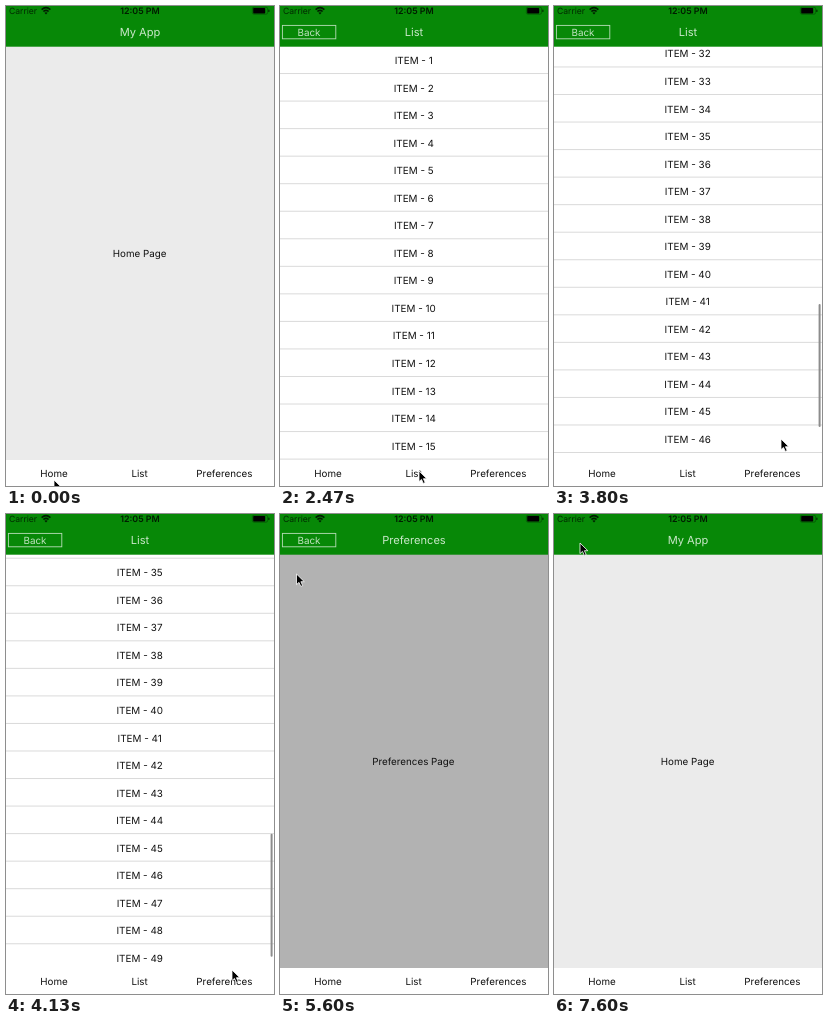
An HTML page for the animation above (8000 ms loop, 268 by 480 pixels).

```html
<!DOCTYPE html>
<html lang="en">
<head>
<meta charset="utf-8">
<title>My App</title>
<style>
html, body { margin: 0; width: 100%; height: 100%; overflow: hidden; background: #fff; }
svg { display: block; width: 100%; height: 100%; }
text {
  font-family: Inter, "Liberation Sans", sans-serif;
  text-anchor: middle; white-space: pre; text-rendering: geometricPrecision;
}
</style>
</head>
<body>
<svg id="stage" viewBox="0 0 268 480">
  <defs><clipPath id="view"><rect y="40" width="268" height="414"/></clipPath></defs>
  <g id="home"></g>
  <g id="list"></g>
  <g id="prefs"></g>
  <g id="status" fill="#011c01">
    <path d="M35.6 3.6Q40 -.4 44.4 3.6M37.4 5.5Q40 3.2 42.6 5.5" fill="none" stroke="#011c01" stroke-width="1.5"/>
    <path d="M38.4 6.8Q40 5.6 41.6 6.8L40 8.4Z"/>
    <rect x="246.4" y="1.2" width="15.2" height="7" rx="1.6" fill="none" stroke="#044804" stroke-width=".6"/>
    <rect x="247.2" y="2" width="12" height="5.4" rx=".7" fill="#000"/>
    <rect x="262.4" y="3.6" width="1" height="2.4" rx=".5"/>
  </g>
  <g id="tabs"><rect y="454" width="268" height="26" fill="#fff"/></g>
  <path id="cursor" d="M0 0V10.6L2.5 8.4L4.3 12.4L6.2 11.6L4.4 7.7H7.8Z"
    fill="#000" stroke="#fff" stroke-width=".8" stroke-linejoin="round"/>
</svg>
<script>
const LOOP = 8000, ROW = 27.54, COUNT = 50, TOP = 40, VIEW = 414;
const MAX = ROW * COUNT - VIEW;
const $ = id => document.getElementById(id);

function add(parent, tag, attrs, content = "") {
  const el = document.createElementNS("http://www.w3.org/2000/svg", tag);
  for (const key in attrs) el.setAttribute(key, attrs[key]);
  el.textContent = content;
  return parent.appendChild(el);
}
const box = (parent, x, y, width, height, fill) => add(parent, "rect", { x, y, width, height, fill });
// Text centred on (x, y)
const label = (parent, s, x, y, size, fill = "#111", weight = 400) =>
  add(parent, "text", { x, y: y + size * .36, "font-size": size, fill, "font-weight": weight }, s);

function header(page, title, back) {
  box(page, 0, 0, 268, TOP + .7, "#078807");
  label(page, title, 134, 26.4, 11.1, "#cbe8cb");
  if (!back) return;
  add(page, "rect", { x: 2.4, y: 19.4, width: 53.4, height: 13.4, fill: "none", stroke: "#b5dcb5", "stroke-width": .9 });
  label(page, "Back", 29, 26, 9.9, "#c0e2c0");
}

const home = $("home"), list = $("list"), prefs = $("prefs");
box(home, 0, TOP, 268, VIEW, "#ebebeb");
label(home, "Home Page", 133.6, 247.5, 9.8);
header(home, "My App");

box(list, 0, TOP, 268, VIEW, "#fff");
const clip = add(list, "g", { "clip-path": "url(#view)" });
const rows = add(clip, "g", {});
for (let i = 0; i < COUNT; i++) {
  const y = TOP + i * ROW;
  label(rows, "ITEM - " + (i + 1), 133.7, y + 14.5, 9.9);
  box(rows, 0, y + ROW - .5, 268, 1, "#dadada");
}
const bar = add(clip, "rect", { x: 264.6, width: 2, height: 123, rx: 1, fill: "#8c8c8c" });
header(list, "List", true);

box(prefs, 0, TOP, 268, VIEW, "#b2b2b2");
label(prefs, "Preferences Page", 133.4, 247.5, 9.8);
header(prefs, "Preferences", true);

label($("status"), "Carrier", 17, 4.8, 8.6, "#022c02");
label($("status"), "12:05 PM", 134, 4.8, 8.9, "#011c01", 600);

const [, listTab, prefsTab] = [["Home", 48], ["List", 133.6], ["Preferences", 218.4]]
  .map(([s, x]) => label($("tabs"), s, x, 467.5, 9.8));

const ramp = (t, a, b) => Math.min(1, Math.max(0, (t - a) / (b - a)));
const smooth = p => p * p * (3 - 2 * p);
const span = (t, inA, inB, outA, outB) => ramp(t, inA, inB) - ramp(t, outA, outB);

// Pointer stops: time, x, y
const path = [
  [0, 48, 474], [130, 48, 474], [200, 54, 482], [560, 130, 482], [600, 130, 479],
  [780, 130, 479], [870, 130.5, 476], [1170, 131, 476], [1270, 139, 465], [2470, 139, 465],
  [2673, 149, 423], [2973, 152, 191.5], [3270, 152, 191.5], [3800, 227, 433],
  [4130, 226, 456], [4330, 223.6, 465.5], [5200, 223.6, 465.5], [5600, 16.5, 60],
  [5870, 26, 29], [LOOP, 26, 29]
];
function pointer(t) {
  const i = path.findIndex(k => k[0] > t), [t0, x0, y0] = path[i - 1], [t1, x1, y1] = path[i];
  const p = ramp(t, t0, t1), e = t0 === 2673 ? p * p : smooth(p);
  return [x0 + (x1 - x0) * e, y0 + (y1 - y0) * e];
}

// Drag, momentum, then a small bounce at the end of the list
function scroll(t) {
  if (t < 2973) return 231 * ramp(t, 2673, 2973) ** 2;
  const hit = 3270 + 500 * Math.log(430 / (1009 - MAX));
  if (t < hit) return 1009 - 430 * Math.exp((3270 - t) / 500);
  const s = t - hit;
  return MAX + (1009 - MAX) / 500 * s * Math.exp(-s / 100);
}

function draw(now) {
  const t = now % LOOP, offset = scroll(t);
  rows.setAttribute("transform", `translate(0 ${-offset})`);
  bar.setAttribute("y", TOP + offset * .3);
  bar.setAttribute("opacity", span(t, 2680, 2760, 4700, 4950));
  list.setAttribute("opacity", span(t, 1630, 1870, 7430, 7600));
  prefs.setAttribute("opacity", span(t, 4780, 5000, 6300, 6600));
  listTab.setAttribute("opacity", 1 - .7 * span(t, 1440, 1470, 1670, 1870));
  prefsTab.setAttribute("opacity", 1 - .7 * span(t, 4640, 4670, 4950, 5130));
  $("cursor").setAttribute("transform", `translate(${pointer(t)})`);
  requestAnimationFrame(draw);
}
draw(performance.now());
</script>
</body>
</html>
```
